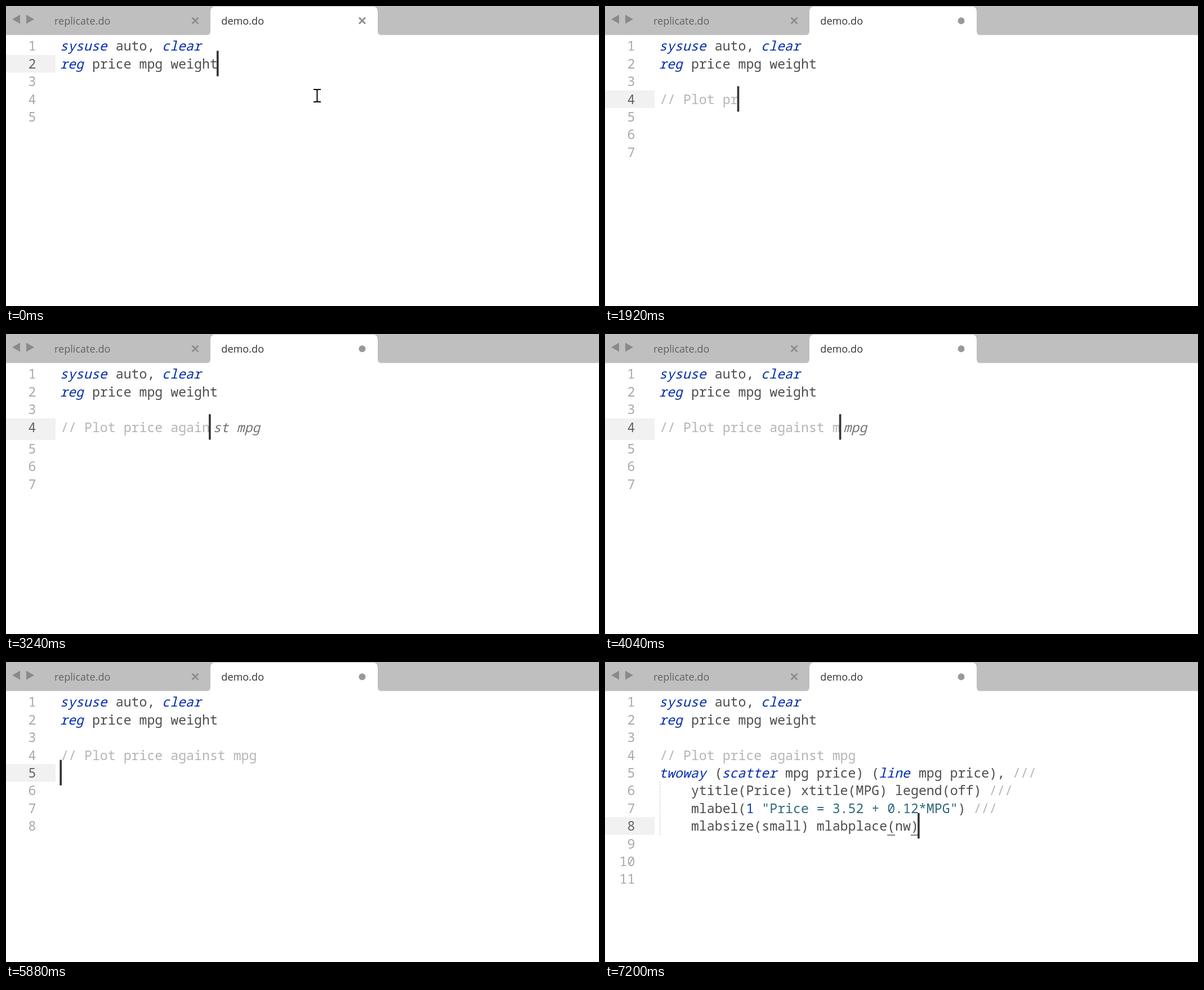
Recreate the animation shown at these times as an HTML page. Size 1053 px wide and 532 px high, loop 7.92 s.

```html
<!DOCTYPE html>
<html lang="en">
<head>
<meta charset="utf-8">
<title>Editor</title>
<style>
  html, body { margin: 0; width: 100%; height: 100%; overflow: hidden; background: #fff; }
  svg { display: block; width: 1053px; height: 532px; }
  text { white-space: pre; }
  .tab { font: 18.1px "Open Sans", "Noto Sans", sans-serif; }
  #page { font: 23.22px "Noto Sans Mono", "DejaVu Sans Mono", monospace; fill: #4d4d4d; }
  .number { fill: #a9a9a9; }
  .active { fill: #626262; }
  .comment { fill: #b5b5b5; }
  .keyword { fill: #002bab; }
  .digit { fill: #0a37ba; }
  .string { fill: #2f687c; }
  .ghost { fill: #737373; }
  .keyword, .ghost { font-style: italic; transform: translateX(-1.2px); }
  .cross { stroke: #8f8f8f; stroke-width: 3; fill: none; }
</style>
</head>
<body>
<svg viewBox="0 0 1053 532">
  <rect width="1053" height="51.5" fill="#bfbfbf"/>
  <path d="M356 52q7 0 7-8V10q0-9 9-9H651q9 0 9 9V44q0 8 7 8z" fill="#fff"/>
  <path d="M11 23.500L25 15.500V31.500zM50 23.500L36 15.500V31.500z" fill="#8a8a8a"/>
  <text class="tab" x="86" y="33" fill="#626262">replicate.do</text>
  <text class="tab" x="382.300" y="33" fill="#333">demo.do</text>
  <path class="cross" d="M330.500 20.500l11 11m0-11l-11 11"/>
  <path class="cross" id="close" d="M627 20.500l11 11m0-11l-11 11"/>
  <circle id="dirty" cx="632.500" cy="26.300" r="6" fill="#999"/>
  <g id="page"></g>
  <path id="pointer" d="M546 148h4.500q2 0 2 2v18q0 2-2 2H546M559 148h-4.500q-2 0-2 2v18q0 2 2 2H559" fill="none" stroke="#000" stroke-width="2"/>
</svg>
<script>
const LOOP = 7920;
const LEFT = 97.2, CHAR = 13.93, TOP = 55.3, ROW = 31.4;
const GHOST_PAD = 7, GHOST_END = 9.2;

const INTRO = ["sysuse auto, clear", "reg price mpg weight"];
const COMMENT = "// Plot price against mpg ";
const TAIL = [
  "    ytitle(Price) xtitle(MPG) legend(off) ///",
  '    mlabel(1 "Price = 3.52 + 0.12*MPG") ///',
  "    mlabsize(small) mlabplace(nw)"
];
const PLOT = ["twoway (scatter mpg price) (line mpg price), ///", ...TAIL];

// One time per typed character of the comment, then corrections as [time, length].
const typed = [
  320, 480, 720, 960, 1120, 1240, 1360, 1480, 1680, 1920, 1960, 2120, 2320,
  2400, 2520, 2600, 2680, 2800, 2880, 3280, 3360, 3480, 4040, 4080, 4120, 4320
].map((time, i) => [time, i + 1]);
const lengths = [[0, 0], ...typed, [4680, 25], [4800, 24], [5240, 23], [5480, 24], [5640, 25]];

const ghosts = [
  { from: 3240, to: 3280, lines: ["st mpg"], caretAfter: false },
  { from: 3880, to: 4040, lines: ["mpg"], caretAfter: true },
  { from: 4040, to: 4080, lines: ["mpg"], caretAfter: false },
  { from: 6240, to: 7200, lines: PLOT, caretAfter: true }
];

// Layout as [time, caret row, number of rows].
const layouts = [[0, 1, 5], [40, 2, 6], [120, 3, 7], [5880, 4, 8], [7200, 7, 11]];

const marks = [...new Set([...lengths, ...layouts].map(s => s[0])
  .concat(ghosts.flatMap(g => [g.from, g.to])))].sort((a, b) => a - b);

const $ = id => document.getElementById(id);
const page = $("page");
const latest = (steps, time) => steps.filter(s => s[0] <= time).pop();

function add(tag, attrs, content) {
  const el = document.createElementNS("http://www.w3.org/2000/svg", tag);
  for (const name in attrs) el.setAttribute(name, attrs[name]);
  if (content) el.textContent = content;
  page.append(el);
}

const box = (x, y, width, height, fill) => add("rect", { x, y, width, height, fill });
const write = (content, x, top, cls) => add("text", { x, y: top + 24.1, class: cls }, content);
const column = n => LEFT + n * CHAR;

const TOKEN = /(\/\/.*)|("[^"]*")|\b(sysuse|clear|reg|twoway|scatter|line)\b|\b(1)\b/g;
const KINDS = ["comment", "string", "keyword", "digit"];

function writeCode(line, top) {
  let at = 0;
  const put = (end, cls) => {
    if (end > at) write(line.slice(at, end), column(at), top, cls);
    at = end;
  };
  for (const m of line.matchAll(TOKEN)) {
    put(m.index, "plain");
    put(m.index + m[0].length, KINDS[m.slice(1).findIndex(Boolean)]);
  }
  put(line.length, "plain");
}

function draw(time) {
  const [, row, count] = latest(layouts, time);
  const [, length] = latest(lengths, time);
  const ghost = ghosts.find(g => time >= g.from && time < g.to);
  const done = time >= 7200;
  const lines = [...INTRO, "", COMMENT.slice(0, length), ...(done ? PLOT : [])];
  const extra = ghost ? GHOST_PAD + (ghost.lines.length - 1) * ROW : 0;
  const rowTop = i => TOP + i * ROW + (i > row ? extra : 0);
  const top = rowTop(row);
  const end = column((lines[row] || "").length);

  page.replaceChildren();
  box(0, top, 88, ROW + extra, "#f1f1f1");
  for (let i = 0; i < count; i++) {
    const label = String(i + 1);
    write(label, 53.4 - label.length * CHAR, rowTop(i), i === row ? "active" : "number");
    writeCode(lines[i] || "", rowTop(i));
  }

  if (done) {
    add("path", {
      d: `M97.5 ${rowTop(5)}V${rowTop(8)}`,
      stroke: "#cfcfcf", "stroke-width": 1.5, "stroke-dasharray": "2 2"
    });
    for (const n of [29, 32]) box(column(n), top + 31, CHAR, 1.8, "#777");
  }

  let caret = end;
  if (ghost) {
    ghost.lines.forEach((line, i) => i
      ? write(line.trimStart(), column(4), top + GHOST_PAD / 2 + i * ROW, "ghost")
      : write(line, end + GHOST_PAD, top, "ghost"));
    if (ghost.caretAfter) caret += GHOST_PAD + ghost.lines[0].length * CHAR + GHOST_END;
  }
  box(caret - 1.8, top - 7.3, 3.6, 45.2, "#333");

  const clean = time < 40;
  $("close").style.display = $("pointer").style.display = clean ? "" : "none";
  $("dirty").style.display = clean ? "none" : "";
}

const start = performance.now();
let shown = -1;

function tick() {
  const time = (performance.now() - start) % LOOP;
  const mark = marks.filter(m => m <= time).pop();
  if (mark !== shown) draw(shown = mark);
  requestAnimationFrame(tick);
}
tick();
</script>
</body>
</html>
```
